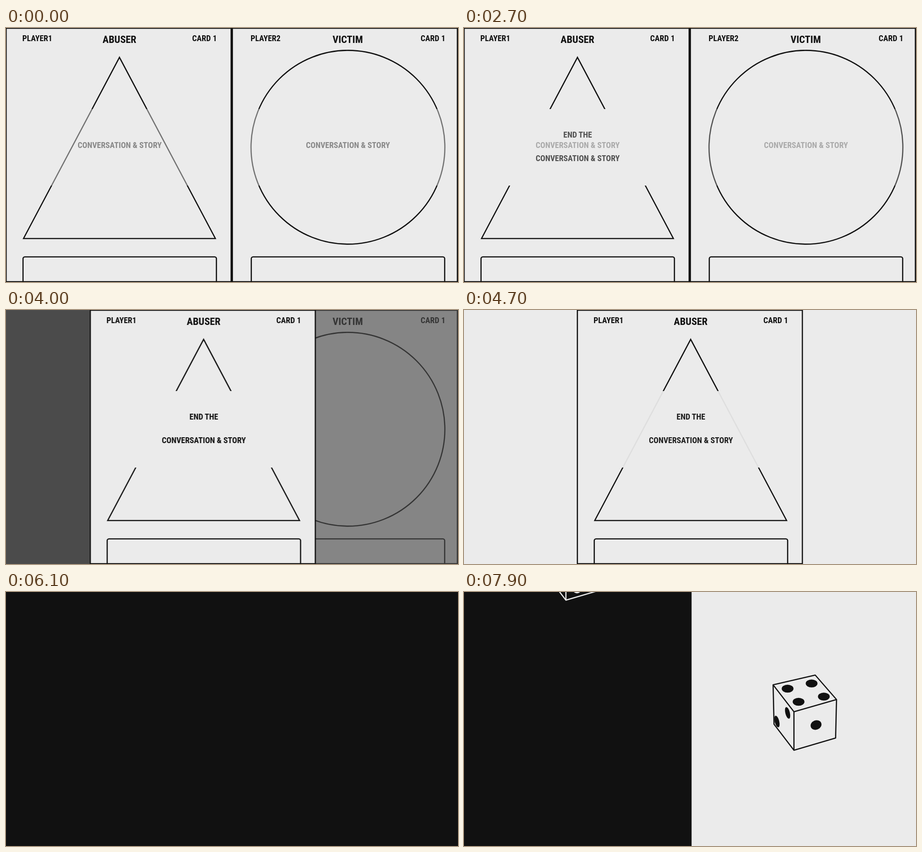
Recreate the animation shown at these times as an HTML page. Size 998 by 561 pixels, loop 8000 ms.

```html
<!DOCTYPE html>
<html lang="en">
<head>
<meta charset="utf-8">
<title>Player cards</title>
<style>
  :root { --ink: #111; --paper: #ebebeb; }
  html, body { margin: 0; width: 100%; height: 100%; overflow: hidden; background: var(--ink); }
  svg { display: block; width: 100%; height: 100%; }

  text { font: 700 18px "Roboto Condensed", Roboto, "Open Sans", sans-serif; font-stretch: 75%; fill: var(--ink); }
  .role { font-size: 22.5px; }
  .mid { text-anchor: middle; }
  .right { text-anchor: end; }
  .paper { fill: var(--paper); }
  .line { fill: none; stroke: var(--ink); stroke-width: 2.6; }
  .sheet { fill: var(--paper); stroke: var(--ink); stroke-width: 2.6; }
  .die { fill: var(--paper); stroke: var(--ink); stroke-width: 2.6; stroke-linejoin: round; }
  .die.dark { fill: var(--ink); stroke: var(--paper); }
  .pips { fill: var(--ink); stroke: none; }
  .dark .pips { fill: var(--paper); }

  /* every track shares one 8 s clock */
  .bg, .talk, .victim, .slide, .abuser, .end, .half, .drop, .late {
    animation: 8s linear infinite;
  }
  .bg { animation-name: bg; }
  .talk { animation-name: talk; }
  .victim { animation-name: victim; }
  .slide { animation-name: slide; }
  .abuser { animation-name: abuser; }
  .end { animation-name: end; }
  .half { animation-name: half; }
  .drop { animation-name: drop; }
  .late { animation-name: late; }

  @keyframes bg {
    0%, 48% { fill: #111; }
    55.6%, 62.1% { fill: #ebebeb; }
    76.1%, 100% { fill: #111; }
  }
  @keyframes talk {
    0% { opacity: .45; }
    9.3%, 21.9% { opacity: 1; }
    38.75%, 100% { opacity: 0; }
  }
  @keyframes victim {
    0%, 43.1% { opacity: 1; }
    54%, 100% { opacity: 0; }
  }
  @keyframes slide {
    0%, 43.1% { transform: none; animation-timing-function: ease-in-out; }
    53.75%, 100% { transform: translateX(250px); }
  }
  @keyframes abuser {
    0%, 64.5% { opacity: 1; }
    76.1%, 100% { opacity: 0; }
  }
  @keyframes end {
    0%, 15% { opacity: 0; }
    15.01%, 58.1% { opacity: 1; }
    69.4%, 100% { opacity: 0; }
  }
  @keyframes half {
    0%, 81.9% { opacity: 0; }
    87.4%, 100% { opacity: 1; }
  }
  @keyframes drop {
    0%, 91.25% { transform: translateY(-398px); }
    98.75%, 100% { transform: none; }
  }
  @keyframes late {
    0%, 97.5% { transform: translateY(-66px); }
    98.75%, 100% { transform: none; }
  }
</style>
</head>
<body>
<svg viewBox="0 0 998 561">
  <defs>
    <rect id="box" x="37.6" y="505.5" width="427" height="90" rx="4"/>
    <g id="talk">
      <rect class="paper" x="7" y="179" width="483" height="169"/>
      <text class="mid" x="251" y="264.5">CONVERSATION &amp; STORY</text>
    </g>
    <g id="cube">
      <path d="M682.5 205L775.5 183.5L822.5 237.5L820.5 322.5L728.5 349.5L684.5 292Z"/>
      <path d="M682.5 205L728.5 264.5L822.5 237.5M728.5 264.5V349.5"/>
    </g>
  </defs>

  <rect class="bg" width="998" height="561"/>

  <g class="victim">
    <rect class="sheet" x="499.8" y=".5" width="496.9" height="560"/>
    <text x="540" y="29">PLAYER2</text>
    <text class="role mid" x="754.5" y="32.5">VICTIM</text>
    <text class="right" x="970" y="29">CARD 1</text>
    <circle class="line" cx="755" cy="263.4" r="214"/>
    <use class="line" href="#box" x="504"/>
    <path class="line" d="M499 560.5H998"/>
  </g>

  <g class="slide">
    <g class="abuser">
      <rect class="sheet" x=".3" y=".5" width="496.8" height="560"/>
      <text x="36" y="29">PLAYER1</text>
      <text class="role mid" x="250.5" y="32.5">ABUSER</text>
      <text class="right" x="465.5" y="29">CARD 1</text>
      <path class="line" d="M250.5 64.8L462.3 465H38.7Z"/>
      <use class="line" href="#box"/>
      <path class="line" d="M0 560.5H497"/>
    </g>
    <g class="end">
      <rect class="paper" x="59" y="179" width="380" height="169"/>
      <text class="mid" x="251" y="241.5">END THE</text>
      <text class="mid" x="251" y="293.5">CONVERSATION &amp; STORY</text>
    </g>
  </g>

  <use class="talk" href="#talk"/>
  <use class="talk" href="#talk" x="504"/>

  <rect class="paper half" x="502.5" width="495.5" height="561"/>

  <g class="die drop">
    <use href="#cube"/>
    <g class="pips">
      <ellipse cx="714.5" cy="213.5" rx="13" ry="8.7"/>
      <ellipse cx="767.5" cy="202" rx="13" ry="8.7"/>
      <ellipse cx="738.7" cy="242.5" rx="13" ry="8.7"/>
      <ellipse cx="794.5" cy="231" rx="13" ry="8.7"/>
      <ellipse rx="12.3" ry="10.3" transform="translate(777.3 293.8) rotate(-22)"/>
      <ellipse rx="5" ry="13.2" transform="translate(714.5 267) rotate(-14)"/>
      <ellipse rx="5" ry="13.2" transform="translate(691 286) rotate(-14)"/>
    </g>
  </g>

  <g class="die dark late">
    <use href="#cube" x="-503.5" y="-331.5"/>
    <g class="pips"><circle cx="249.5" cy="-7" r="10"/></g>
  </g>
</svg>
</body>
</html>
```
